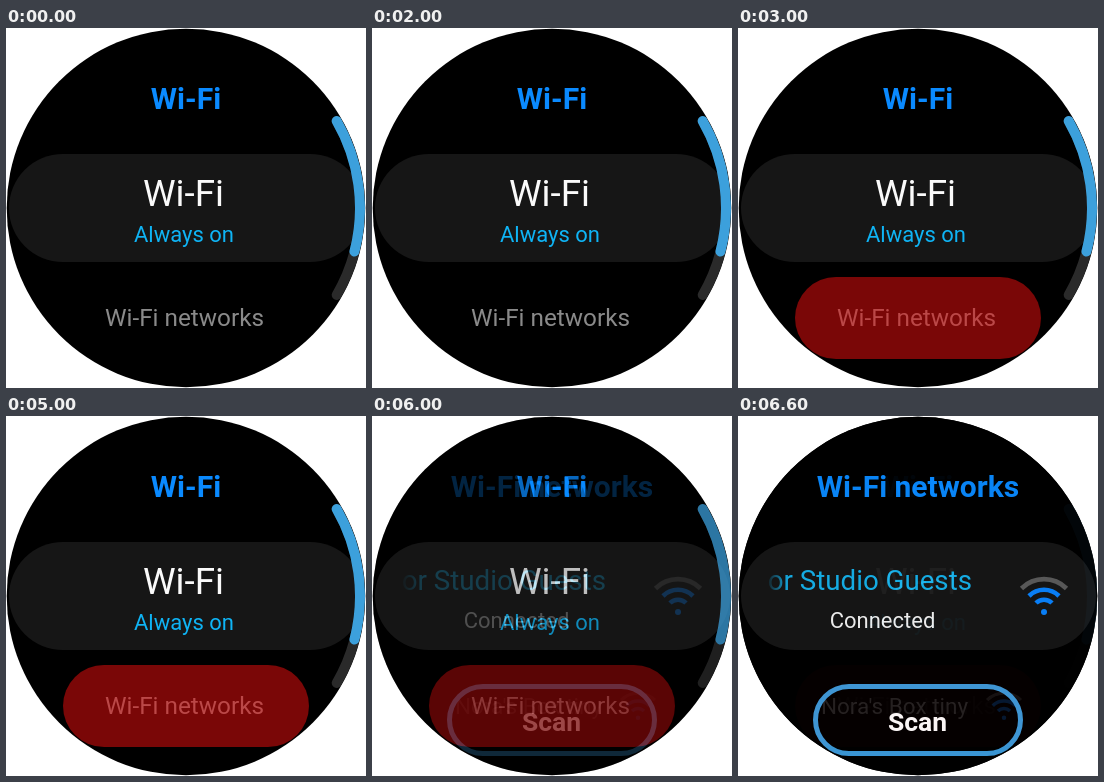
Recreate the animation shown at these times as an HTML page. Size 360x360 px, loop 8000 ms.

```html
<!DOCTYPE html>
<html lang="en">
<head>
<meta charset="utf-8">
<title>Watch Wi-Fi settings</title>
<style>
  html, body { margin: 0; width: 100%; height: 100%; overflow: hidden; background: #fff; }
  svg { display: block; width: 100vw; height: 100vh; }
  text { font-family: Roboto, "Open Sans", sans-serif; text-anchor: middle; }
  .title { font-size: 30px; font-weight: 600; fill: #0a8aff; }
  .small { font-size: 22px; }
  .item { font-size: 24.3px; fill: #8a8a8a; }
  .card { fill: #161616; }
  .line { fill: none; stroke-linecap: round; }
  #mark, #next { opacity: 0; }
</style>
</head>
<body>
<svg viewBox="0 0 360 360">
  <defs>
    <clipPath id="face"><circle cx="180" cy="180" r="179.3"/></clipPath>
    <linearGradient id="fade" gradientUnits="userSpaceOnUse" x1="28" x2="50" y1="0" y2="0">
      <stop offset="0" stop-color="#000"/>
      <stop offset="1" stop-color="#fff"/>
    </linearGradient>
    <mask id="edge" maskUnits="userSpaceOnUse" x="28" y="140" width="222" height="50">
      <rect x="28" y="140" width="222" height="50" fill="url(#fade)"/>
    </mask>
    <g id="wifi" class="line" stroke-width="4.6" style="stroke-linecap:butt">
      <path d="M-22.5-22.5A31.8 31.8 0 0 1 22.5-22.5" stroke="#5c5c5c"/>
      <path d="M-15-15A21.2 21.2 0 0 1 15-15M-8-8A11.3 11.3 0 0 1 8-8" stroke="#0a84ff"/>
      <circle cy="1" r="3" fill="#0a84ff" stroke="none"/>
    </g>
  </defs>
  <g clip-path="url(#face)">
    <g id="settings">
      <rect width="360" height="360"/>
      <text class="title" x="180" y="81">Wi-Fi</text>
      <rect class="card" x="3" y="126" width="355" height="108" rx="54"/>
      <text x="177.5" y="178" font-size="36.8" fill="#fafafa">Wi-Fi</text>
      <text class="small" x="178" y="214" fill="#0fb4f5">Always on</text>
      <text class="item" x="178.5" y="298">Wi-Fi networks</text>
      <rect id="mark" x="57" y="249" width="246" height="82" rx="41" fill="rgb(230,15,15)" fill-opacity=".53"/>
      <path id="track" class="line" stroke="#2a2a2a" stroke-width="10"/>
      <path id="thumb" class="line" stroke="#3ca0dc" stroke-width="10"/>
    </g>
    <g id="next">
      <rect width="360" height="360"/>
      <text class="title" x="180" y="81">Wi-Fi networks</text>
      <rect class="card" x="3" y="126" width="355" height="108" rx="54"/>
      <g mask="url(#edge)">
        <text x="234" y="174" font-size="27.7" fill="#16b2ec" style="text-anchor:end">or Studio Guests</text>
      </g>
      <text class="small" x="144.5" y="212" fill="#f4f4f4">Connected</text>
      <use href="#wifi" x="306" y="195"/>
      <g opacity=".2">
        <text x="156.5" y="298" font-size="22.5" fill="#aaa">Nora's Box tiny</text>
        <use href="#wifi" transform="translate(266 301) scale(.75)"/>
      </g>
      <rect x="77.5" y="270.5" width="205" height="67" rx="33.5" fill="none" stroke="#3d9cdc" stroke-width="5"/>
      <text x="179.5" y="315" font-size="26.5" font-weight="600" fill="#fff">Scan</text>
    </g>
  </g>
</svg>
<script>
  const LOOP = 8000;
  const $ = id => document.getElementById(id);

  function arc(from, to, r = 174) {
    const point = deg => {
      const a = deg * Math.PI / 180;
      return `${180 + r * Math.cos(a)} ${180 + r * Math.sin(a)}`;
    };
    return `M${point(from)}A${r} ${r} 0 0 1 ${point(to)}`;
  }
  $('track').setAttribute('d', arc(-30, 30));
  $('thumb').setAttribute('d', arc(-30, 14.5));

  // Each step is [time in ms, opacity], held until the next one.
  function play(id, steps) {
    const frames = steps.map(([t, opacity]) => ({ offset: t / LOOP, opacity, easing: 'step-end' }));
    frames.push({ offset: 1, opacity: steps[steps.length - 1][1] });
    $(id).animate(frames, { duration: LOOP, iterations: Infinity });
  }

  play('mark', [[0, 0], [1000, 1], [2000, 0], [3000, 1], [4000, 0], [5000, 1]]);
  const blend = Array.from({ length: 7 }, (_, i) => [6000 + i * 100, 0.26 + i * 0.117]);
  play('next', [[0, 0], ...blend]);
</script>
</body>
</html>
```
